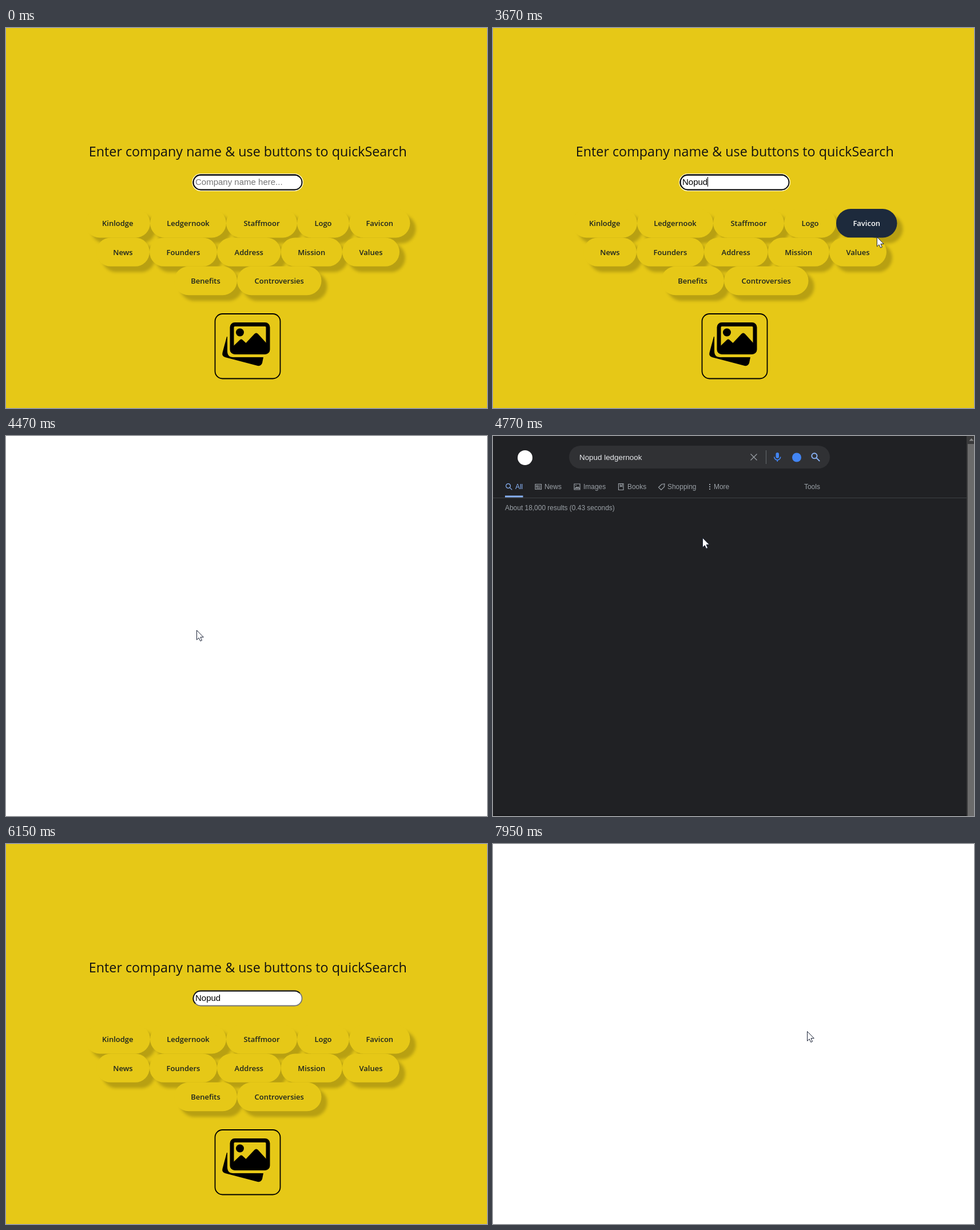
Recreate the animation shown at these times as an HTML page. Size 841x666 px, loop 8 s.

```html
<!DOCTYPE html>
<html lang="en">
<head>
<meta charset="utf-8">
<title>quickSearch</title>
<style>
html, body { margin: 0; width: 100%; height: 100%; overflow: hidden; background: #fff; }
svg { display: block; width: 841px; height: 666px; }
text { font-family: "Liberation Sans", Arial, sans-serif; white-space: pre; }
#home text.ui { font-family: "Open Sans", "Noto Sans", sans-serif; text-anchor: middle; }
.btn rect { fill: #e6c817; filter: drop-shadow(10px 10px 2.8px rgba(0, 0, 0, .2)); }
.btn text { font-size: 13px; font-weight: 600; fill: #1d2420; }
.btn.hot rect { fill: #1d2a3c; }
.btn.hot text { fill: #fff; }
#entry { font-size: 15px; }
#results text { font-size: 11.95px; fill: #9aa0a6; }
.line { fill: none; stroke: #9aa0a6; stroke-width: 1.2; }
.blue { stroke: #8ab4f8; }
.edge { fill: none; stroke-width: 1.8; }
</style>
</head>
<body>
<svg viewBox="0 0 841 666">
  <rect width="841" height="666" fill="#fff"/>

  <g id="home">
    <rect width="841" height="666" fill="#e6c817"/>
    <text class="ui" x="422.8" y="224.5" font-size="23.3" fill="#111">Enter company name &amp; use buttons to quickSearch</text>
    <rect id="halo" class="edge" x="326" y="256" width="193" height="29" rx="14.5" stroke="#fff8d0"/>
    <rect class="edge" x="327.5" y="257.5" width="190" height="26" rx="13" style="fill:#fff" stroke="#767676"/>
    <path class="edge" d="M331.3 279.7A13 13 0 0 1 340.5 257.5H504.5A13 13 0 0 1 513.7 261.3" stroke="#151515"/>
    <rect id="ring" class="edge" x="327.5" y="257.5" width="190" height="26" rx="13" stroke="#101010"/>
    <text id="entry" x="331" y="275"></text>
    <rect id="caret" y="261" width="1" height="17"/>
    <g id="buttons"></g>
    <rect class="edge" x="365.5" y="501" width="114" height="113.5" rx="13" stroke="#000"/>
    <path d="M386 541L378.5 569Q377 575 383 577L440 592Q446 593 448 587L450 577H397Q387 577 387 566V541Z"/>
    <rect x="395" y="519.5" width="63" height="49" rx="5" fill="none" stroke="#000" stroke-width="7"/>
    <circle cx="409" cy="533.5" r="7"/>
    <path d="M398 557L409 546.5Q411.500 544.5 414 547L419.500 552L434.500 536Q437.500 533 440.500 536L455 552V566H398Z"/>
  </g>

  <g id="results">
    <rect width="841" height="666" fill="#202124"/>
    <circle cx="56" cy="38" r="13" fill="#fff"/>
    <rect x="133" y="17" width="456" height="40" rx="20" fill="#303134"/>
    <text x="151" y="41.5" style="font-size:13.4px;fill:#e8eaed">Nopud ledgernook</text>
    <path class="line" d="M450.500 31.5l11 11m0-11l-11 11"/>
    <path class="line" style="stroke:#5f6368" d="M477.5 25v24"/>
    <rect x="494.5" y="29" width="5.5" height="10" rx="2.75" fill="#4285f4"/>
    <path class="line" style="stroke:#4285f4;stroke-width:1.6" d="M491.7 36.5a5.5 5.5 0 0 0 11 0M497.2 42v3"/>
    <circle cx="531" cy="37.5" r="8" fill="#4285f4"/>
    <path class="line blue" style="stroke-width:1.9" d="M566.5 34.8a4.6 4.6 0 1 1-9.2 0a4.6 4.6 0 1 1 9.2 0M565.2 38.2l6 6"/>
    <path class="line blue" d="M30.5 87.5a3.9 3.9 0 1 1-7.8 0a3.9 3.9 0 1 1 7.8 0M29.3 90.3l4 4"/>
    <path class="line" d="M74 84.5h10.5v9H74zM76 87h3v2h-3zM80.5 87h2.5M80.5 89h2.5M76 91.3h7"/>
    <path class="line" d="M142 84h10v10h-10zM143.8 92l2.2-2.5 1.5 1.5 1.5-1.5 2 2.5zM144 86.5h2"/>
    <path class="line" d="M219.5 83.5h8.5v11h-8.5zM222.5 84v4.5l1.6-1.3 1.6 1.3V84"/>
    <path class="line" d="M289.5 90l5.5-5.5 5-.5-.5 5-5.5 5.5zM297.5 86.5h.6"/>
    <path d="M378 84h2v2h-2zm0 4h2v2h-2zm0 4h2v2h-2z" fill="#9aa0a6"/>
    <g id="tabs"></g>
    <rect x="21" y="104.5" width="31.5" height="3" fill="#8ab4f8"/>
    <path class="line" style="stroke:#3c4043;stroke-width:1" d="M0 108.5h828"/>
    <text x="21" y="130">About 18,000 results (0.43 seconds)</text>
    <rect x="828" width="13" height="666" fill="#3a3a3b"/>
    <rect x="830" y="14" width="11" height="652" fill="#6b6b6b"/>
    <path d="M832.5 8.5h8l-4-4.5z" fill="#8a8a8a"/>
    <rect y="664" width="828" height="2" fill="#18191b"/>
  </g>

  <path id="mouse" d="M.5.5V17.2L4.2 13.8 6.8 19.4 9.5 18.2 7 12.6H12.3Z" fill="#fff" stroke="#1c2438"/>
</svg>

<script>
const $ = id => document.getElementById(id);
const NAME = "Nopud", LOOP = 8000;

// Each row: top edge, button edges from left to right, labels
const rows = [
  [317, [138.5, 252, 385, 509, 600, 706.5], "Kinlodge Ledgernook Staffmoor Logo Favicon"],
  [367.4, [158, 251, 369, 480.5, 588, 688], "News Founders Address Mission Values"],
  [417.8, [294, 404, 551.5], "Benefits Controversies"]
];
const SVG = "http://www.w3.org/2000/svg";
function add(parent, tag, attrs, content = "") {
  const el = parent.appendChild(document.createElementNS(SVG, tag));
  for (const k in attrs) el.setAttribute(k, attrs[k]);
  el.textContent = content;
  return el;
}
const buttons = rows.flatMap(([y, xs, labels]) => labels.split(" ").map((label, i) => {
  const x = xs[i], w = xs[i + 1] - x, h = 50.4;
  const el = add($("buttons"), "g", { class: "btn" });
  add(el, "rect", { x, y, width: w, height: h, rx: h / 2 });
  add(el, "text", { class: "ui", x: x + w / 2, y: y + 30.4 }, label);
  return { el, x, y, w, h };
}));

const tabs = { All: 39, News: 90, Images: 158, Books: 235, Shopping: 305, More: 386, Tools: 544 };
for (const t in tabs) {
  add($("tabs"), "text", { x: tabs[t], y: 93, style: t == "All" ? "fill:#8ab4f8" : "" }, t);
}

// Pointer trips: [time, x, y]; hidden outside of them
const trips = [
  [[3670, 672, 366], [3740, 590, 354], [3950, 450, 345], [4140, 333, 340], [4749, 333, 340],
   [4770, 366, 178], [4890, 366, 178], [5420, 832, -22]],
  [[6410, 609, 44], [6600, 510, 150], [6780, 431, 230], [6950, 525, 330], [7100, 540, 412],
   [7200, 535, 405], [7340, 549, 348], [7870, 549, 348], [7950, 549, 328], [LOOP, 549, 328]]
];
function pointer(t) {
  for (const trip of trips) {
    for (let i = 1; i < trip.length; i++) {
      const [t0, x0, y0] = trip[i - 1], [t1, x1, y1] = trip[i];
      if (t >= t0 && t < t1) {
        const k = (t - t0) / (t1 - t0);
        return [x0 + (x1 - x0) * k, y0 + (y1 - y0) * k];
      }
    }
  }
  return null;
}

const within = (t, ...spans) => spans.some(([a, b]) => t >= a && t < b);
const show = (id, on) => $(id).style.display = on ? "" : "none";
const keys = [1450, 1800, 1860, 2020, 2270];

function draw(t) {
  const typed = NAME.slice(0, keys.filter(k => t >= k).length);
  const entry = $("entry"), pos = pointer(t);
  show("home", !within(t, [4470, 6150], [7680, LOOP]));
  show("results", within(t, [4750, 6150]));
  show("halo", t < 4280);
  show("ring", t < 4280);
  entry.textContent = typed || "Company name here...";
  entry.setAttribute("fill", typed ? "#000" : "#757575");
  show("caret", within(t, [560, 1040], [1450, 2860], [3340, 3850]));
  $("caret").setAttribute("x", Math.round(331 + (typed ? typed.length * 8.34 + 2.1 : 0)));
  show("mouse", pos);
  if (pos) $("mouse").setAttribute("transform", `translate(${pos})`);
  for (const b of buttons) {
    b.el.classList.toggle("hot", !!pos && pos[0] >= b.x && pos[0] < b.x + b.w &&
      pos[1] >= b.y && pos[1] < b.y + b.h);
  }
}

const start = performance.now();
function tick() {
  draw((performance.now() - start) % LOOP);
  requestAnimationFrame(tick);
}
tick();
</script>
</body>
</html>
```
